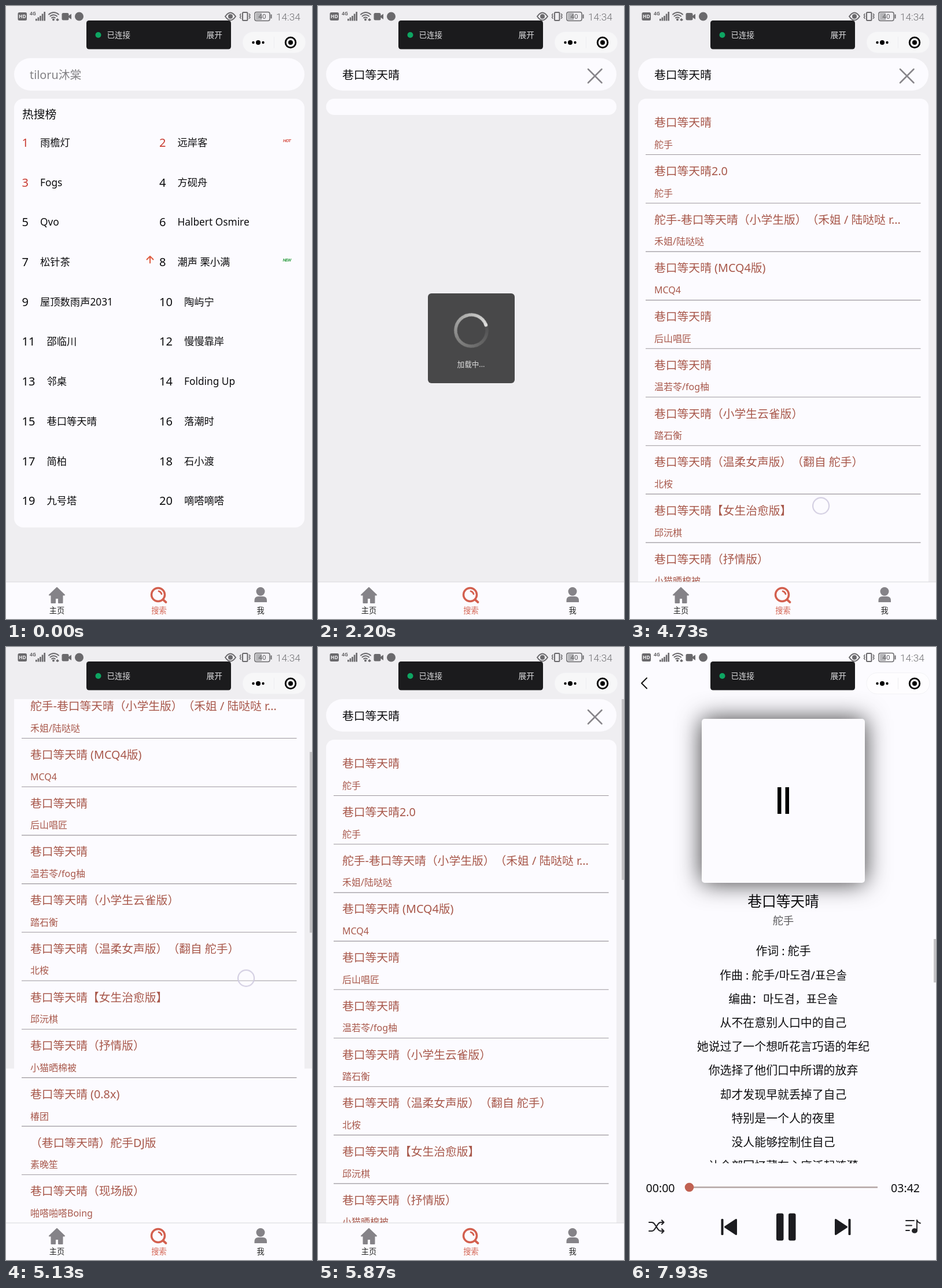
An HTML page that plays this animation: 529x1058 px, repeating every 8 s.

```html
<!DOCTYPE html>
<html lang="zh-CN">
<head>
<meta charset="utf-8">
<title>Music search</title>
<style>
html, body { margin: 0; width: 100%; height: 100%; overflow: hidden; }
#stage {
  --paper: #fcfbff;
  position: relative; width: 529px; height: 1058px; overflow: hidden; background: #efeef1;
  font-family: "Noto Sans", "Noto Sans CJK SC", sans-serif;
}
svg, .layer { position: absolute; left: 0; top: 0; width: 529px; height: 1058px; }
svg { overflow: visible; display: block; }
text { white-space: pre; text-spacing-trim: space-all; }
.mid { text-anchor: middle; }
.line { fill: none; stroke-linecap: round; stroke-linejoin: round; }
.paper { fill: var(--paper); }
.tag { text-anchor: middle; font: italic 700 8px Roboto, sans-serif; letter-spacing: -.8px; }

#view { position: absolute; left: 0; top: 90px; width: 529px; height: 904px; overflow: hidden; background: var(--paper); }
#view svg { top: -90px; }
#scroll { animation: scroll 8s linear infinite; }
#thumb, #lyricThumb { position: absolute; left: 525px; width: 4px; background: #c3c2c5; }
#thumb { top: 90px; height: 312px; animation: thumb 8s linear infinite, thumbShow 8s linear infinite; }
#lyricThumb { top: 504px; height: 75px; }

/* hard state changes */
#hot { animation: hot 8s step-end infinite; }
#query { animation: query 8s step-end infinite; }
#results { animation: results 8s step-end infinite; }
#loader { animation: loader 8s step-end infinite; }
#song { animation: song 8s step-end infinite; }
#lyrics, #lyricThumb { animation: lyrics 8s step-end infinite; }
@keyframes hot { 0% { opacity: 1 } 10.9%, 100% { opacity: 0 } }
@keyframes query { 0% { opacity: 0 } 10.9%, 100% { opacity: 1 } }
@keyframes results { 0% { opacity: 0 } 45%, 100% { opacity: 1 } }
@keyframes loader { 0% { opacity: 0 } 10.9% { opacity: 1 } 45%, 100% { opacity: 0 } }
@keyframes song { 0% { opacity: 0 } 86.7%, 100% { opacity: 1 } }
@keyframes lyrics { 0% { opacity: 0 } 93.3%, 100% { opacity: 1 } }

@keyframes scroll {
  0%, 60% { transform: translateY(0) }
  64.125% { transform: translateY(-266px) }
  65.875%, 66.5% { transform: translateY(-320px) }
  70% { transform: translateY(-20px) }
  71%, 100% { transform: translateY(0) }
}
@keyframes thumb {
  0%, 60% { transform: translateY(0) }
  64.125% { transform: translateY(91px) }
  65.875%, 66.5% { transform: translateY(110px) }
  70% { transform: translateY(7px) }
  71%, 100% { transform: translateY(0) }
}
@keyframes thumbShow {
  0%, 60% { opacity: 0 }
  60.5%, 75% { opacity: 1 }
  78.5%, 100% { opacity: 0 }
}

#loader { position: absolute; left: 189.5px; top: 496px; width: 150px; height: 155px; border-radius: 6px; background: #484849; }
#loader svg { left: -189.5px; top: -496px; }
#spin { position: absolute; left: 45px; top: 34px; width: 60px; height: 60px; animation: spin 8s linear infinite; }
#spin::before {
  content: ""; position: absolute; inset: 0; border-radius: 50%;
  background: conic-gradient(rgba(222,222,218,.04), rgba(222,222,218,.42) 50%, rgba(226,226,224,.95));
  -webkit-mask: radial-gradient(circle, transparent 24px, #000 24.6px);
  mask: radial-gradient(circle, transparent 24px, #000 24.6px);
}
#spin::after {
  content: ""; position: absolute; left: 27px; top: 0; width: 5.6px; height: 5.6px;
  border-radius: 50%; background: #dededc;
}
@keyframes spin { from { transform: rotate(108.5deg) } to { transform: rotate(2582.7deg) } }

#player { background: var(--paper); animation: slide 8s linear infinite; }
@keyframes slide {
  0%, 80% { transform: translateX(529px); animation-timing-function: cubic-bezier(.2,.7,.3,1) }
  84.5%, 100% { transform: translateX(0) }
}
#cover {
  position: absolute; left: 124px; top: 124px; width: 282px; height: 283px; border-radius: 5px;
  background: var(--paper); box-shadow: 0 0 42px rgba(0,0,0,.78);
}
#lyricView { position: absolute; left: 0; top: 504px; width: 529px; height: 387px; overflow: hidden; }
#lyricView svg { top: -504px; }

#ring {
  position: absolute; left: -15px; top: -15px; width: 26px; height: 26px; border: 2px solid #cfcadf;
  border-radius: 50%; background: rgba(255,255,255,.2);
  animation: finger 8s linear infinite, touch 8s step-end infinite;
}
@keyframes finger {
  0%, 20% { transform: translate(112px, 718px) }
  58%, 59.125% { transform: translate(330px, 863px) }
  60% { transform: translate(338px, 838px) }
  64.125% { transform: translate(415px, 572px) }
  65.875%, 66.5% { transform: translate(426px, 518px) }
  70% { transform: translate(396px, 818px) }
  71% { transform: translate(392px, 840px) }
  76%, 100% { transform: translate(160px, 216px) }
}
@keyframes touch {
  0% { opacity: 0 }
  8.375% { opacity: 1 }
  10% { opacity: 0 }
  59.1% { opacity: 1 }
  71% { opacity: 0 }
  77% { opacity: 1 }
  79%, 100% { opacity: 0 }
}
</style>
</head>
<body>
<div id="stage">
  <div id="view">
    <svg id="scroll">
      <rect y="90" width="529" height="904" fill="#efeef1"/>
      <rect class="paper" x="14" y="90" width="502" height="56" rx="28"/>
      <g id="hot"><rect class="paper" x="14" y="160" width="502" height="740" rx="16"/></g>
      <g id="query">
        <rect class="paper" x="14" y="160" width="502" height="28" rx="14"/>
        <path class="line" d="M467 109l23.500 23.500M490.500 109l-23.500 23.500" stroke="#87858a" stroke-width="2.500"/>
      </g>
      <g id="results"><rect class="paper" x="14" y="160" width="502" height="2540" rx="16"/></g>
    </svg>
  </div>
  <div id="thumb"></div>

  <svg id="tabs">
    <rect class="paper" y="994" width="529" height="64"/>
    <path d="M0 994h529" stroke="#d8d8da"/>
    <path d="M88 1004l-13 12.500h3.500V1030h6.500v-8h6v8h6.500v-13.500h3.500z" fill="#858388" stroke="#858388" stroke-width="2" stroke-linejoin="round"/>
    <g class="line" stroke="#d3604f">
      <circle cx="263" cy="1016" r="11.500" stroke-width="3.500"/>
      <path d="M272 1025l4.500 4" stroke-width="3.800"/>
      <path d="M264 1010q4 1 5 5" stroke-width="2.800"/>
    </g>
    <g fill="#858388">
      <circle cx="440" cy="1010.500" r="7.500"/>
      <path d="M429.500 1029v-3q0-7 7-7h7.500q7 0 7 7v3z"/>
    </g>
  </svg>

  <div id="loader"><div id="spin"></div><svg id="loadText"></svg></div>

  <div id="player" class="layer">
    <div id="cover"></div>
    <svg id="panel">
      <path class="line" d="M29 53.500l-9 9 9 9" stroke="#111" stroke-width="2"/>
      <path d="M255 242h6.500v46h-6.500zM268.500 242h6.500v46h-6.500z"/>
      <path d="M103 932.500h325" stroke="#b3a5a3" stroke-width="2.500"/>
      <circle cx="102.500" cy="932.500" r="7.800" fill="#c06152"/>
      <g fill="#1c1c20">
        <rect x="253" y="977.500" width="12.500" height="47" rx="3"/>
        <rect x="274" y="977.500" width="12.500" height="47" rx="3"/>
        <g id="skip">
          <path d="M355.500 988.500l19 12.500-19 12.500z" stroke="#1c1c20" stroke-width="3" stroke-linejoin="round"/>
          <rect x="377.500" y="987" width="4" height="28" rx="1.500"/>
        </g>
        <use href="#skip" transform="matrix(-1 0 0 1 539 0)"/>
      </g>
      <g class="line" stroke="#222226" stroke-width="2.200">
        <path d="M33 993h4.500q3 0 5 3l6 9q2 3 5 3h4M33 1008h4.500q3 0 5-3l6-9q2-3 5-3h4M55 989.500l3.500 3.500-3.500 3.500M55 1004.500l3.500 3.500-3.500 3.500"/>
        <path d="M477 990h14M477 998.500h10M477 1007h6M496 1007V989q1 4 6 5.500" stroke-width="1.900"/>
      </g>
      <ellipse cx="492" cy="1007.500" rx="5" ry="4.300" fill="#222226"/>
      <g id="song"></g>
    </svg>
    <div id="lyricView"><svg id="lyrics"></svg></div>
    <div id="lyricThumb"></div>
  </div>

  <svg id="top">
    <g fill="#6a696c">
      <rect x="20.500" y="11" width="15.500" height="14" rx="2.500"/>
      <path d="M51 22h2.600v3.500H51zM54.600 19.500h2.600v6h-2.600zM58.200 17h2.600v8.500h-2.600zM61.800 13.500h2.600v12h-2.600zM65.400 10h2.600v15.500h-2.600z"/>
      <rect x="96.500" y="12" width="12" height="12.500" rx="2.500"/>
      <path d="M108 17l5-3.500v9.500l-5-3.500z"/>
      <circle cx="126.500" cy="18" r="7.500"/>
      <circle cx="82" cy="23.500" r="2"/>
      <circle cx="388" cy="18" r="4"/>
      <path d="M457.500 14.500h2v7h-2zM86 24l3-3 3 3-3 2z"/>
      <rect x="432" y="12" width="10" height="12" fill="#b5b5b8"/>
    </g>
    <g class="line" stroke="#6a696c" stroke-width="2">
      <path d="M74 14.500q8.500-7 17 0M76.500 17.500q6-4.500 11.500 0M79 20.500q3-2 6 0"/>
      <path d="M379 18q9-13 18 0q-9 13-18 0z"/>
      <rect x="409" y="11" width="8.500" height="14" rx="1.500"/>
      <path d="M406 13.500l-1.500 2 1.500 2-1.500 2 1.500 2M420.500 13.500l1.500 2-1.500 2 1.500 2-1.500 2" stroke-width="1.500"/>
      <rect x="430" y="10.500" width="26" height="15" rx="3" stroke-width="1.500"/>
    </g>
    <rect x="409" y="44.500" width="109" height="36.500" rx="18.250" fill="#fff" fill-opacity=".5" stroke="#f1f1f4"/>
    <path d="M463.500 53v20" stroke="#ededf0"/>
    <circle cx="427.500" cy="63" r="2.200"/><circle cx="436" cy="63" r="4"/><circle cx="444.500" cy="63" r="2.200"/>
    <circle cx="492" cy="63" r="8.800" fill="none" stroke="#000" stroke-width="2.800"/><circle cx="492" cy="63" r="4"/>
    <rect x="139" y="25" width="250" height="49.500" rx="4.500" fill="#1b1b1d"/>
    <circle cx="159.500" cy="50" r="5" fill="#0ea562"/>
  </svg>
  <div id="ring"></div>
</div>
<script>
const NS = 'http://www.w3.org/2000/svg';
const SONG = '巷口等天晴', SINGER = '舵手';
const RED = '#a8584b';
const el = id => document.getElementById(id);

function add(parent, tag, attrs) {
  const node = document.createElementNS(NS, tag);
  for (const key in attrs) node.setAttribute(key, attrs[key]);
  return el(parent).appendChild(node);
}

// y is the visual middle of the glyphs
function text(parent, x, y, size, str, fill = '#0c0c0e', attrs = {}) {
  add(parent, 'text', { x, y: y + size * .37, 'font-size': size, fill, ...attrs }).textContent = str;
}
const mid = { class: 'mid' };
const light = { 'font-weight': 300 };

// hot list
text('hot', 41, 118.5, 19.8, 'tiloru沐棠', '#828184');
text('hot', 28, 187, 19.8, '热搜榜');
const hot = ['雨檐灯', '远岸客', 'Fogs', '方砚舟', 'Qvo', 'Halbert Osmire', '松针茶', '潮声 栗小满',
  '屋顶数雨声2031', '陶屿宁', '邵临川', '慢慢靠岸', '邻桌', 'Folding Up', SONG, '落潮时',
  '简柏', '石小渡', '九号塔', '嘀嗒嘀嗒'];
hot.forEach((name, i) => {
  const x = i % 2 ? 265 : 27.5, y = 235.5 + 68.7 * (i >> 1);
  text('hot', x, y, 20, i + 1, i < 3 ? '#c83a30' : '#0c0c0e');
  text('hot', x + (i < 9 ? 31.5 : 43), y, 17.3, name);
});
text('hot', 485.5, 232, 8, 'HOT', '#d8564c', { class: 'tag' });
text('hot', 485.5, 438.5, 8, 'NEW', '#3fa552', { class: 'tag' });
add('hot', 'path', { class: 'line', d: 'M249 443.500v-11M243.500 437.500l5.500-5.500 5.500 5.500', stroke: '#dd5a3f', 'stroke-width': 2 });

// search results
text('query', 42, 118.5, 19.8, SONG);
const rows = [
  ['', SINGER], ['2.0', SINGER],
  [`${SINGER}-${SONG}（小学生版）（禾姐 / 陆哒哒 r...`, '禾姐/陆哒哒'],
  [' (MCQ4版)', 'MCQ4'], ['', '后山唱匠'], ['', '温若苓/fog柚'],
  ['（小学生云雀版）', '踏石衡'], [`（温柔女声版）（翻自 ${SINGER}）`, '北桉'],
  ['【女生治愈版】', '邱沅棋'], ['（抒情版）', '小猫晒棉被'], [' (0.8x)', '椿团'],
  [`（${SONG}）${SINGER}DJ版`, '素晚笙'], ['（现场版）', '啪嗒啪嗒Boing'],
  ['（钢琴版）', '南栀'], ['', '苏木木']
];
rows.forEach(([title, singer], i) => {
  const y = 256.5 + 83.7 * i;
  text('results', 42, y - 55.5, 19.8, title.includes(SONG) ? title : SONG + title, RED);
  text('results', 42, y - 17.5, 16, singer, RED);
  add('results', 'path', { d: `M27 ${y}h475.500`, stroke: '#9c979c', 'stroke-width': 1.1 });
});

text('loadText', 264.5, 618, 12.6, '加载中...', '#dedede', mid);

// tab bar
const tabLabel = { ...mid, ...light };
text('tabs', 88, 1043, 13.2, '主页', '#222', tabLabel);
text('tabs', 264.5, 1043, 13.2, '搜索', '#d3604f', tabLabel);
text('tabs', 440, 1043, 13.2, '我', '#222', tabLabel);

// player
text('song', 265, 438.5, 24.7, SONG, '#0c0c0e', mid);
text('song', 265, 472.5, 18.2, SINGER, '#5c5b5e', mid);
text('panel', 27.5, 933.5, 19.6, '00:00');
text('panel', 451, 933.5, 19.6, '03:42');
[`作词 : ${SINGER}`, `作曲 : ${SINGER}/마도겸/표은솔`, '编曲：마도겸，표은솔', '从不在意别人口中的自己',
  '她说过了一个想听花言巧语的年纪', '你选择了他们口中所谓的放弃', '却才发现早就丢掉了自己',
  '特别是一个人的夜里', '没人能够控制住自己', '让全部回忆藏在心底泛起涟漪'
].forEach((line, i) => text('lyrics', 265, 525 + 41.2 * i, 19.9, line, '#0c0c0e', mid));

// status bar
text('top', 28.3, 18, 8.5, 'HD', '#f4f4f6', { ...mid, 'font-weight': 700 });
text('top', 41, 13, 8.5, '4G', '#6a696c', { 'font-weight': 600 });
text('top', 443, 18, 11.5, '40', '#5c5b5e', mid);
text('top', 467, 18.5, 17.2, '14:34', '#707073', { ...light, 'font-family': 'Roboto, sans-serif' });
text('top', 174.5, 50, 13.5, '已连接', '#dcdcde', light);
text('top', 346.5, 50, 13.7, '展开', '#dcdcde', light);
</script>
</body>
</html>
```
